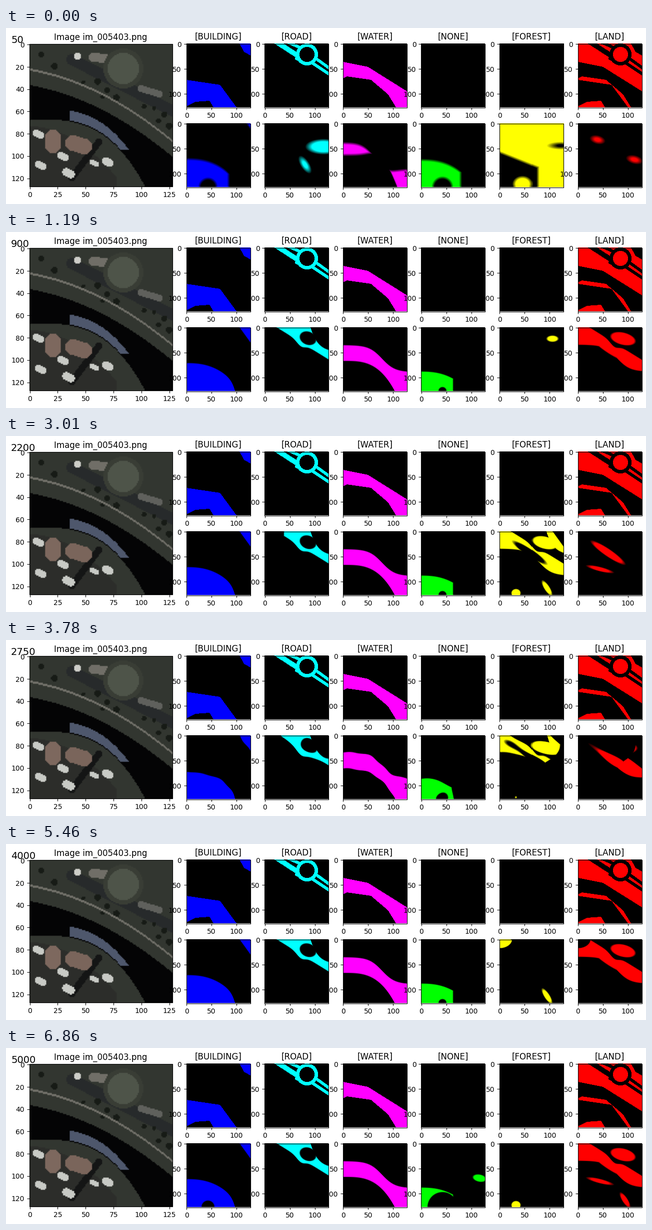
Recreate the animation shown at these times as a matplotlib script. Size 1280 by 353 pixels, loop 6.93 s.

```python
import numpy as np
import matplotlib.pyplot as plt
from matplotlib.animation import FuncAnimation
from matplotlib.patches import Rectangle
from matplotlib.path import Path

W, H, DPI, N = 1280, 353, 100, 128
FRAMES, INTERVAL = 99, 70
PT = DPI / 72
plt.rcParams["font.family"] = "DejaVu Sans"

x, y = np.meshgrid(np.arange(N) + 0.5, np.arange(N) + 0.5)
COLORS = {"BUILDING": "blue", "ROAD": "cyan", "WATER": "magenta",
          "NONE": "lime", "FOREST": "yellow", "LAND": "red"}


# ---- shape helpers: masks and signed fields (positive inside) ----
def poly(*corners):
    grid = np.column_stack([x.ravel(), y.ravel()])
    return Path(corners + corners[:1]).contains_points(grid).reshape(N, N)


def disc(cx, cy, r):
    return np.hypot(x - cx, y - cy) < r


def strip(x0, y0, x1, y1, half):
    dx, dy = x1 - x0, y1 - y0
    t = np.clip(((x - x0) * dx + (y - y0) * dy) / (dx * dx + dy * dy), 0, 1)
    return np.hypot(x - x0 - t * dx, y - y0 - t * dy) < half


def ellipse(cx, cy, rx, ry, angle=0):
    c, s = np.cos(angle), np.sin(angle)
    u, v = x - cx, y - cy
    return (1 - np.hypot((u * c + v * s) / rx, (v * c - u * s) / ry)) * min(rx, ry)


def union(*fields):
    return np.maximum.reduce(fields)


def common(*fields):
    return np.minimum.reduce(fields)


# ---- curves of the scene ----
river_top = 36 + 54 / (1 + np.exp((78 - x) / 13))
river_bottom = 67.5 + 8 * (x / 55) ** 3.2
roofs_top = 72 + 12 * (x / 60) ** 2.5 + 16 * np.exp((x - 97) / 6)
road_bottom = 0.62 * (x - 24) + 8 * np.exp(-((x - 73) / 12) ** 2)
road_top = np.where(x < 90, -20, 50 - 50 * np.exp((92 - x) / 15))
corner = x - 106 - 0.72 * y

river = common(y - river_top, river_bottom - y)
island = ellipse(90, 23, 25, 12, 0.25)
meadow = union(common(river_top - 1 - y, y - road_bottom - 1), island)
verge = common(road_top - 2 - y, -corner - 1)
bank = ellipse(94, 114, 16, 5, 1.0)
far_bank = ellipse(44, 76, 24, 4, 0.25)

# ---- how the guesses develop during training ----
STAGES = [0, 17, 28, 43, 65, 78, 98]


def keyed(k, *values):
    return np.interp(k, STAGES, values)


def shown(k, pattern):
    """Offset that hides a field at the stages marked 0."""
    return keyed(k, *[0 if c == "1" else -15 for c in pattern])


def guess_fields(k):
    early = max(0, 1 - k / 17) ** 2

    yard = np.hypot(x - 43, y - 128) - keyed(k, 17, -9, -9, -9, 2, -9, 13)
    roofs = common(y - roofs_top, 84 + 40 * (1 - early) - x, yard)
    building = union(roofs, corner + shown(k, "0111111"))

    left_end = x - keyed(k, 20, 20, 51, 39, 20, 20, 20)
    lane = common(road_bottom - y, y - road_top, left_end, -ellipse(87, 22, 17, 13, 0.4))
    lane_bits = union(ellipse(118, 47, 30, 13), ellipse(81, 83, 14, 6, 1.0))
    road = union(lane - 30 * early, lane_bits + shown(k, "1000000"))

    water = river - early * (4 + 20 * np.exp(-((x - 76) / 30) ** 2))

    none = union(common(roofs - 2, 79 - x) + shown(k, "1000000"),
                 ellipse(117, 70, 13, 7, 0.2) + shown(k, "0000001"))

    # Forest spreads over the meadow from the top left and draws back again.
    front = keyed(k, 300, -20, 35, 190, 52, 25, -20) - np.hypot(x, 1.4 * y)
    streak = ellipse(60, 43, 38, 7, 0.6)
    forest = common(union(meadow, verge), front, -streak)
    forest = union(forest, bank + shown(k, "0001010"),
                   ellipse(105, 23, 11, 6) + shown(k, "0100100"),
                   ellipse(33, 124, 9, 8) + shown(k, "0001001"))
    woods = common(union(58 + 0.4 * x - y, x - 76), -ellipse(122, 45, 18, 5))
    woods = union(woods, ellipse(46, 122, 17, 14))
    forest = (1 - early) * forest + early * woods

    patches = union(ellipse(39, 33, 11, 6, 0.25), ellipse(113, 73, 12, 6, 0.25))
    land = union(common(meadow, -front), patches + shown(k, "1000000"),
                 streak + shown(k, "0101111"), bank + shown(k, "0000101"),
                 far_bank + shown(k, "0001001"))
    return building, road, water, none, forest, land


def wobble(rng):
    """Smooth noise that differs from step to step."""
    waves = [np.cos(fx * x + fy * y + rng.uniform(0, 2 * np.pi)) for fx, fy in rng.normal(0, 0.08, (4, 2))]
    return sum(waves)


def guesses_at(k):
    rng = np.random.default_rng(k)
    i = min(np.searchsorted(STAGES, k, side="right") - 1, len(STAGES) - 2)
    between = np.sin(np.pi * (k - STAGES[i]) / (STAGES[i + 1] - STAGES[i]))
    soft = 2 + 4 * np.exp(-k / 6)
    for field in guess_fields(k):
        yield np.clip(0.5 + (field + 1.2 * between * wobble(rng)) / soft, 0, 1)


def tint(mask, name):
    return mask[..., None] * np.array(plt.matplotlib.colors.to_rgb(COLORS[name]), float)


# ---- labelled regions ----
def labelled_regions():
    building = poly((106, 0), (115, 17), (128, 24), (128, 0))
    building |= poly((0, 73), (67, 83), (100, 128), (54, 128), (46, 115), (18, 117), (0, 126))
    water = poly((0, 37), (50, 47), (128, 96), (128, 128), (106, 128), (90, 102), (56, 73), (8, 66), (0, 70))
    road = disc(85, 22, 22) | strip(24, -3, 67, 25, 5) | strip(45, -3, 78, 11, 3)
    road |= strip(64, 30, 84, 41, 3) | strip(97, 40, 133, 64, 3) | strip(104, 31, 133, 52, 3)
    road &= ~disc(85, 22, 15)
    empty = np.zeros((N, N), bool)
    return building, road, water, empty, empty, ~(building | road | water)


def aerial_view():
    """Flat-toned view from above: bank, river, roundabout and roofs."""
    view = np.full((N, N, 3), (50, 54, 48), np.uint8)
    rng = np.random.default_rng(4)

    def paint(mask, *rgb):
        view[mask] = rgb

    paint(strip(38, 14, 128, 60, 5), 39, 42, 43)
    paint(strip(57, 12, 68, 13, 4), 112, 110, 103)
    paint(disc(43, 11, 3), 205, 205, 200)
    paint(strip(100, 40, 116, 45, 3), 95, 96, 92)
    paint(disc(84, 22, 18), 57, 61, 53)
    paint(disc(84, 22, 14), 78, 84, 73)
    for cx in rng.uniform(0, N, 12):
        paint(disc(cx, 10 + 0.45 * cx + rng.uniform(-8, 8), rng.uniform(1.5, 3)), 23, 27, 22)
    slope = 0.17 * x + 0.0026 * x ** 2
    paint(abs(y - 23 - slope) < 1, 112, 111, 104)
    paint((y > 37 + slope) & (y < river_bottom), 4, 4, 5)
    paint((x > 36) & (y < 95) & (y > river_bottom - 10) & (y < river_bottom - 1), 78, 87, 108)
    paint((y > 74 + 0.0075 * x ** 2) & (x < 78), 44, 45, 42)
    paint(strip(62, 88, 38, 120, 3), 20, 21, 21)
    paint(strip(21, 84, 21, 91, 7), 125, 104, 94)
    paint(strip(39, 89, 49, 92, 7), 122, 101, 91)
    for cx, cy in [(8, 81), (10, 109), (30, 101), (58, 107), (70, 106), (35, 116)]:
        paint(strip(cx - 2, cy - 1, cx + 2, cy + 1, rng.uniform(2, 4)), 200, 202, 197)
    return view


# ---- layout in stage pixels ----
fig = plt.figure(figsize=(W / DPI, H / DPI), dpi=DPI, facecolor="white")
ax = fig.add_axes([0, 0, 1, 1])
ax.set_xlim(0, W)
ax.set_ylim(H, 0)
ax.axis("off")


def panel(left, top, size, xticks, yticks, title=None, **style):
    bottom = top + size
    image = ax.imshow(np.zeros((N, N, 3)), extent=(left, left + size, bottom, top), aspect="auto", **style)
    ax.add_patch(Rectangle((left, top), size, size, fill=False, lw=0.8, zorder=2.5))
    scale, tick, pad = size / N, 3.5 * PT, 7 * PT
    xs = [left + (v + 0.5) * scale for v in xticks]
    ys = [top + (v + 0.5) * scale for v in yticks]
    ax.vlines(xs, bottom, bottom + tick, color="black", lw=0.8, snap=True)
    ax.hlines(ys, left - tick, left, color="black", lw=0.8, snap=True)
    for tick_x, v in zip(xs, xticks):
        ax.text(tick_x, bottom + pad, str(v), size=10, ha="center", va="top")
    for tick_y, v in zip(ys, yticks):
        ax.text(left - pad, tick_y, str(v), size=10, ha="right", va="center_baseline")
    if title:
        ax.text(left + size / 2, top - 6 * PT, title, size=12, ha="center", va="baseline")
    return image


photo = panel(46.5, 32.3, 286, range(0, 126, 25), range(0, 121, 20), "Image im_005403.png")
photo.set_data(aerial_view())

images = []
for i, (name, region) in enumerate(zip(COLORS, labelled_regions())):
    left, ticks = 360.5 + 156.6 * i, (0, 50, 100)
    label = panel(left, 31.5, 128, ticks, ticks, f"[{name}]", interpolation="nearest")
    label.set_data(tint(region, name))
    images.append(panel(left, 191.5, 128, ticks, ticks, interpolation="nearest"))

counter = ax.text(10, 30, "", size=14, ha="left", va="baseline")


def update(k):
    # One report is skipped a little past the middle.
    counter.set_text(str(50 * (k + 1 + (k >= 55))))
    for image, name, guess in zip(images, COLORS, guesses_at(k)):
        image.set_data(tint(guess, name))
    return [counter, *images]


animation = FuncAnimation(fig, update, frames=FRAMES, interval=INTERVAL, repeat=True)
plt.show()
```
